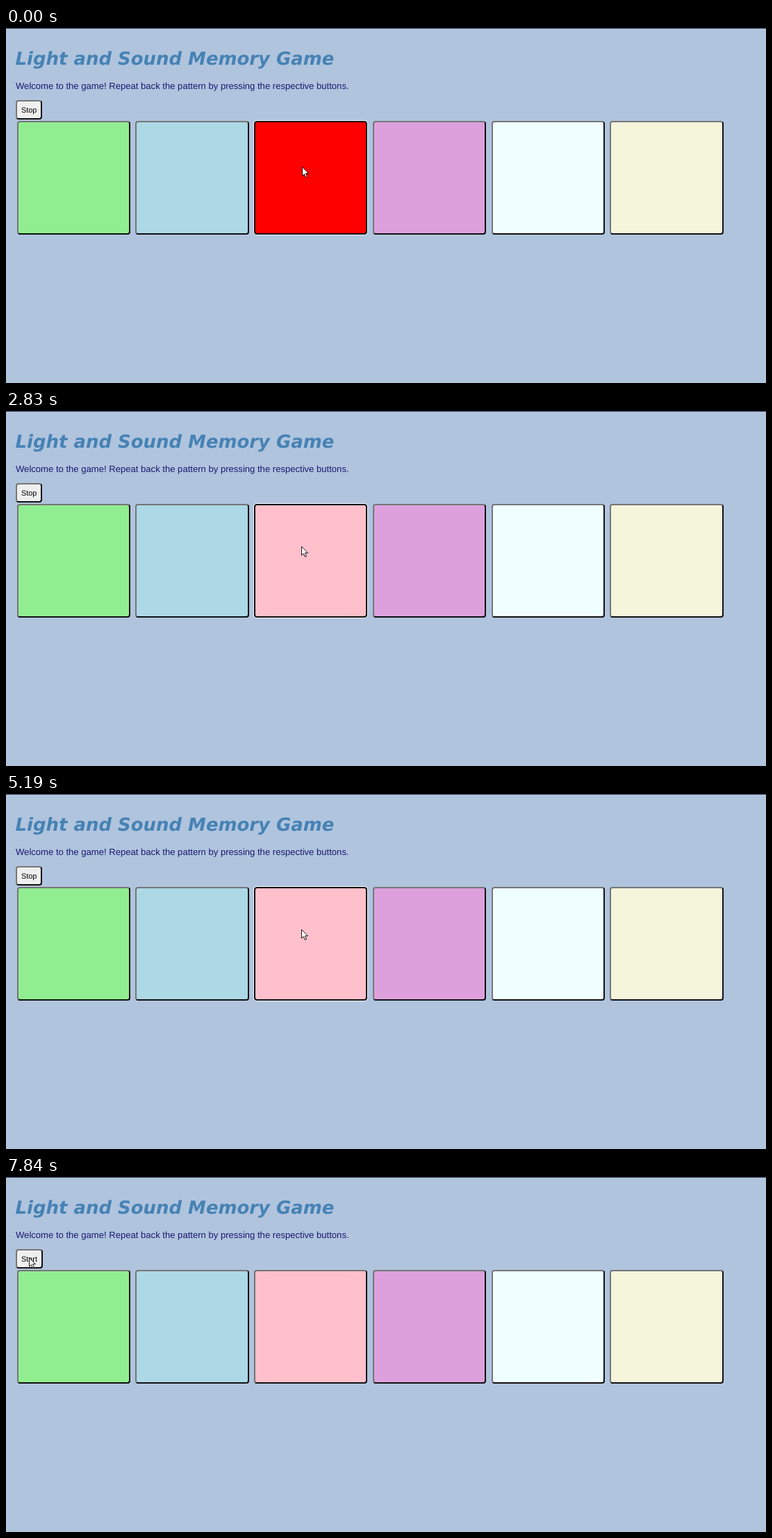
An HTML page that plays this animation: 1094x512 px, repeating every 8 s.

```html
<!DOCTYPE html>
<html lang="en">
<head>
<meta charset="utf-8">
<title>Light and Sound Memory Game</title>
<style>
  html, body { margin: 0; width: 100%; height: 100%; overflow: hidden; }
  body { position: relative; background: #b0c4de; border-top: 1px solid #2c3a4e; box-sizing: border-box; }
  .stage { position: absolute; left: 0; top: -1px; width: 1094px; height: 512px; }
  svg { position: absolute; left: 0; top: 0; text-rendering: geometricPrecision; }

  .key {
    position: absolute; box-sizing: border-box;
    left: calc(15.7px + 170.7px * var(--i)); top: 134px;
    width: 163.4px; height: 164px;
    border: 2px solid; border-color: #767676 #111 #111 #767676;
    border-radius: 4px; background: var(--c);
  }
  .key::after {
    content: ""; position: absolute; inset: -2px;
    border: 2px solid #101010; border-radius: 4px;
    outline: 1px solid #f4f7fb; opacity: 0;
  }
  .toggle { left: 14px; top: 104px; width: 38px; height: 28px; --c: #efefef; }

  .pink, .plum, .toggle, .key::after, .stop, .start, .cursor { animation: 8s step-end infinite; }
  .pink { animation-name: pink; }
  .plum { animation-name: plum; }
  .toggle { animation-name: widen; }
  .pink::after { animation-name: pink-focus; }
  .plum::after { animation-name: plum-focus; }
  .toggle::after { animation-name: toggle-focus; }
  .stop { animation-name: stop; }
  .start { animation-name: start; }
  .cursor { animation-name: point; }

  @keyframes pink {
    0%, 12.75%, 21.25%, 29.25%, 33.875%, 48.625%, 55%, 69.5%, 74.125% { background: red; }
    1.5%, 16.25%, 23%, 30.75%, 35.375%, 50.125%, 58.5%, 71%, 77.25%, 100% { background: pink; }
  }
  @keyframes plum {
    0%, 64.875%, 83.25%, 100% { background: plum; }
    61.75%, 81.75% { background: purple; }
  }
  @keyframes pink-focus { 0% { opacity: 1; } 81.75%, 100% { opacity: 0; } }
  @keyframes plum-focus { 0%, 96.5%, 100% { opacity: 0; } 81.75% { opacity: 1; } }
  @keyframes toggle-focus { 0%, 98%, 100% { opacity: 0; } 96.5% { opacity: 1; } }
  @keyframes widen { 0% { width: 38px; } 98%, 100% { width: 39px; } }
  @keyframes stop { 0% { opacity: 1; } 98%, 100% { opacity: 0; } }
  @keyframes start { 0% { opacity: 0; } 98%, 100% { opacity: 1; } }
  @keyframes point {
    0% { transform: translate(426px, 200px); }
    4.625% { transform: translate(425px, 197px); }
    6.125% { transform: translate(425px, 195px); }
    71% { transform: translate(426px, 197px); }
    77.25% { transform: translate(434px, 198px); }
    78.75% { transform: translate(520px, 206px); }
    80.25% { transform: translate(588px, 212px); }
    86.375% { transform: translate(548px, 208px); }
    87.875% { transform: translate(400px, 194px); }
    89.375% { transform: translate(205px, 174px); }
    90.875% { transform: translate(85px, 161px); }
    92.75% { transform: translate(35px, 118px); }
    94.625%, 100% { transform: translate(33px, 116px); }
  }
</style>
</head>
<body>
<div class="stage">
  <div class="key toggle"></div>
  <div class="key" style="--i:0;--c:lightgreen"></div>
  <div class="key" style="--i:1;--c:lightblue"></div>
  <div class="key pink" style="--i:2;--c:pink"></div>
  <div class="key plum" style="--i:3;--c:plum"></div>
  <div class="key" style="--i:4;--c:azure"></div>
  <div class="key" style="--i:5;--c:beige"></div>
  <svg width="1094" height="512" viewBox="0 0 1094 512" font-family="'Liberation Sans', Arial, sans-serif">
    <text x="13.6" y="53" fill="steelblue" font-family="'DejaVu Sans', Verdana, sans-serif" font-size="25.95" font-weight="bold" font-style="italic">Light and Sound Memory Game</text>
    <text x="14" y="88" fill="midnightblue" font-size="13.09">Welcome to the game! Repeat back the pattern by pressing the respective buttons.</text>
    <g font-size="10.9">
      <text class="stop" x="22" y="122">Stop</text>
      <text class="start" x="22" y="122">Start</text>
    </g>
    <path class="cursor" d="M.5 .5V13.2L3.4 10.5L5.4 15.3L7.5 14.4L5.5 9.7H9.5Z" fill="#fff" stroke="#000" stroke-width=".9"/>
  </svg>
</div>
</body>
</html>
```
